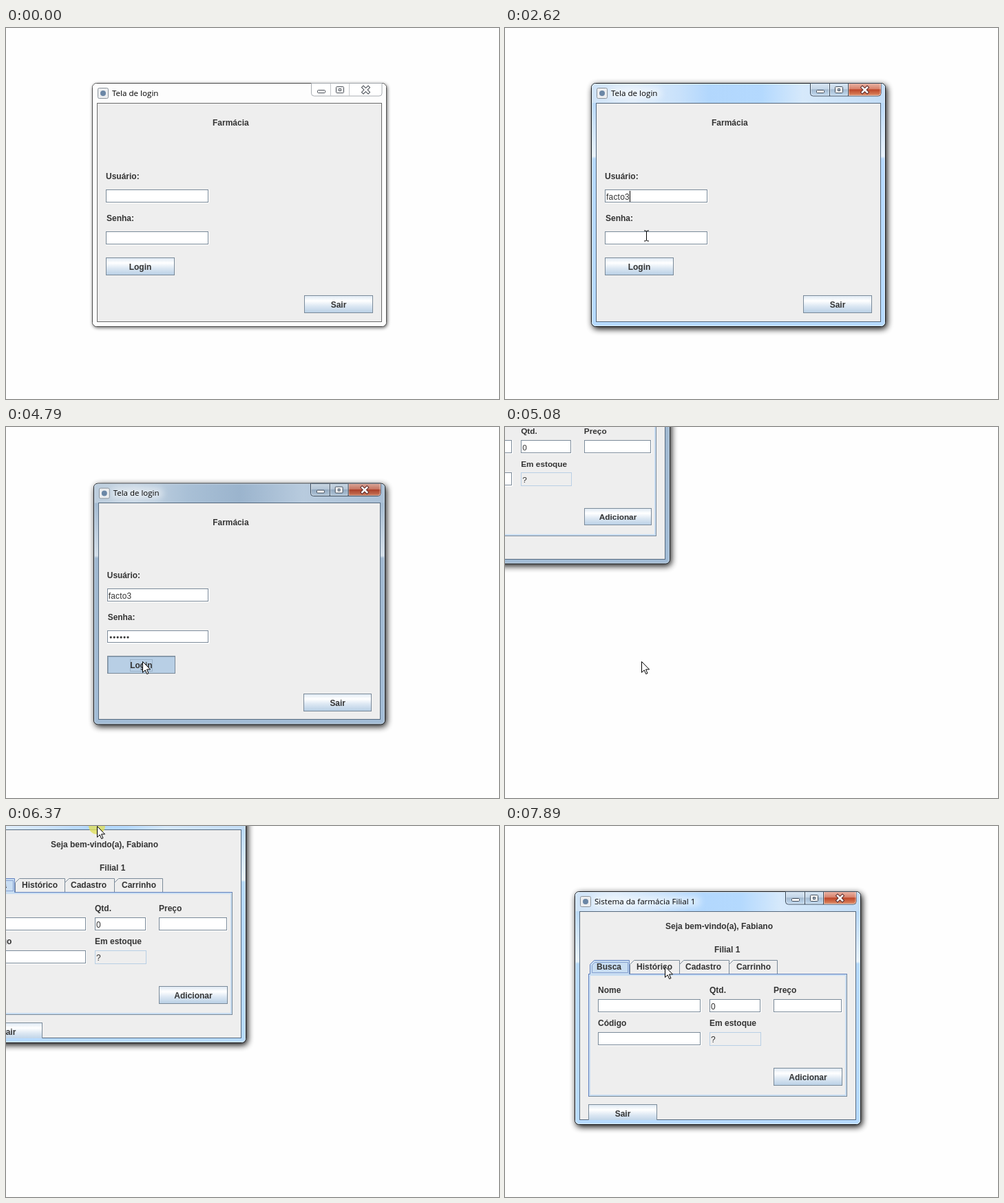
An HTML page for the animation above (8 s loop, 716 by 540 pixels).

```html
<!DOCTYPE html>
<html lang="pt">
<head>
<meta charset="utf-8">
<title>Tela de login</title>
<style>
html, body { margin: 0; width: 100%; height: 100%; overflow: hidden; background: #fefefe; }
svg { display: block; width: 716px; height: 540px; }
text { font: 12px "Liberation Sans", Arial, sans-serif; fill: #333; white-space: pre; }
.b { font-weight: bold; }
.title { font: 11.6px "Open Sans", "Noto Sans", sans-serif; fill: #000; }
.mid { text-anchor: middle; }
.crisp { shape-rendering: crispEdges; }
</style>
</head>
<body>
<svg id="stage" viewBox="0 0 716 540" xmlns="http://www.w3.org/2000/svg"></svg>
<script>
const LOOP = 8000;
const USER = 'facto3';
const CARET = [22, 25, 32, 38, 42, 49, 56];
const SHADE = '#7a8a99', BLUE = '#6382bf', PALE = '#b8cfe5';

const MODES = {
  off: {
    edge: '#4f4f4f', rim: '#fff', blur: 2.4, dark: .6, dx: 1, dy: 1.5, line: '#6b6b6b',
    side: [[0, '#fdfdfd'], [1, '#fdfdfd']],
    bar: [[0, '#fdfdfd'], [1, '#fdfdfd']]
  },
  on: {
    edge: '#16191d', rim: '#e9f4ff', blur: 4.6, dark: .95, dx: 2, dy: 3, line: '#56697d',
    side: [[0, '#c0dcf7'], [.08, '#b9d9f8'], [.3, '#eaf3fc'], [.31, '#b7dafd'], [1, '#b7dbff']],
    bar: [[0, '#cfe3f7'], [.14, '#deecfa'], [.3, '#c8e1fb'], [.4, '#b2d7fd'], [.58, '#b4d9fe'], [.72, '#d6e9fb'], [1, '#c3ddf6']]
  },
  dim: {
    edge: '#16191d', rim: '#d3e1ee', blur: 4.6, dark: .9, dx: 2, dy: 3, line: '#56697d',
    side: [[0, '#a6bdd4'], [.08, '#a3bad1'], [.3, '#d5e0ea'], [.31, '#a0b8d0'], [1, '#a2bcd6']],
    bar: [[0, '#bccddd'], [.14, '#c6d5e3'], [.32, '#a9c0d6'], [.5, '#9bb4cd'], [.72, '#b8cbde'], [1, '#aac0d6']]
  }
};

const stops = list => list.map(([o, c]) => `<stop offset="${o}" stop-color="${c}"/>`).join('');
const gradient = (id, list, across) =>
  `<linearGradient id="${id}" x2="${across ? 1 : 0}" y2="${across ? 0 : 1}">${stops(list)}</linearGradient>`;
const box = (x, y, w, h, fill, more = '') => `<rect x="${x}" y="${y}" width="${w}" height="${h}" fill="${fill}" ${more}/>`;
const frame = (x, y, w, h, color, fill = 'none') =>
  box(x + .5, y + .5, w - 1, h - 1, fill, `stroke="${color}" class="crisp"`);
const text = (x, y, s, cls = 'b', more = '') => `<text x="${x}" y="${y}" class="${cls}" ${more}>${s}</text>`;

const button = (x, y, label) =>
  frame(x, y, 100, 26, SHADE, 'url(#face)') + text(x + 50, y + 18, label, 'b mid');
const field = (x, y, w, value = '') =>
  box(x, y, w, 20, '#fff') + frame(x, y, w - 1, 19, SHADE, '#fff') + text(x + 2, y + 15, value, '');

function captionButtons(w, mode) {
  const live = mode !== 'off';
  const ink = live ? '#414c5a' : '#4a4f57';
  const x = w - 110;
  const shape = `M${x + .5} .5V15q0 4 4 4H${x + 99}q4 0 4-4V.5z`;
  const cut = `M${x + 28.5} 1V19M${x + 55.5} 1V19`;
  const close = `M${x + 56} 1H${x + 103}V15q0 3.5-4 3.5H${x + 56}z`;
  const cross = `M${x + 76} 6.5l7 7m0-7l-7 7`;
  return (live
      ? `<path d="${shape}" fill="url(#cap-${mode})" stroke="#38485a"/><path d="${close}" fill="url(#red-${mode})"/>` +
        `<path d="M${x + 1.5} 1V15q0 3 3 3H${x + 27.5}V1M${x + 29.5} 1V18H${x + 54.5}V1M${x + 56.5} 1V18H${x + 99}q3 0 3-3V1" fill="none" stroke="#fff" opacity=".45"/>` +
        `<path d="${cut}" stroke="#38485a"/>`
      : `<path d="${shape}" fill="#fff" stroke="#a9adb2"/><path d="${cut}" stroke="#c4c7ca"/>`) +
    box(x + 9.5, 10.5, 11, 4, '#fff', `stroke="${ink}" rx="1"`) +
    box(x + 36.5, 5.5, 11, 9, '#fff', `stroke="${ink}" rx="1"`) +
    box(x + 40.5, 8.5, 3, 3, live ? '#b7c8da' : '#fff', `stroke="${ink}"`) +
    `<path d="${cross}" stroke="${live ? '#5b2a2a' : ink}" stroke-width="4.6" stroke-linecap="square"/>` +
    `<path d="${cross}" stroke="#fff" stroke-width="2.6" stroke-linecap="square"/>`;
}

function chrome(w, h, title, mode) {
  const m = MODES[mode];
  const glow = mode === 'off' ? '' :
    `<rect x="26" y="7" width="${title.length * 5.4 + 6}" height="16" rx="8" fill="#fff" opacity=".5" filter="url(#glow)"/>`;
  return `<g data-mode="${mode}">
    <rect x="${m.dx}" y="${m.dy}" width="${w}" height="${h}" rx="7" opacity="${m.dark}" filter="url(#sh-${mode})"/>
    <rect x=".5" y=".5" width="${w - 1}" height="${h - 1}" rx="6" fill="url(#side-${mode})" stroke="${m.edge}"/>
    <path d="M1 29V7q0-6 6-6H${w - 7}q6 0 6 6V29z" fill="url(#bar-${mode})"/>
    <rect x="1.5" y="1.5" width="${w - 3}" height="${h - 3}" rx="5" fill="none" stroke="${m.rim}" opacity=".8"/>
    ${glow}
    <rect x="8.5" y="7.5" width="15" height="15" rx="2" fill="#eceef0" stroke="#8c949c"/>
    <circle cx="16" cy="15" r="4" fill="#6b87a6"/>
    ${text(29, 19, title, 'title')}
    ${captionButtons(w, mode)}
    ${frame(7, 29, w - 14, h - 36, m.line, '#eee')}
  </g>`;
}

function loginWindow() {
  const dots = Array.from({ length: 6 }, (_, i) => `<circle class="dot" cx="${25.5 + 5 * i}" cy="226.5" r="1.6" fill="#333"/>`);
  return `<g id="login">
    ${['off', 'on', 'dim'].map(m => chrome(428, 355, 'Tela de login', m)).join('')}
    ${text(175, 62, 'Farmácia')}
    ${text(20, 140, 'Usuário:')}${field(20, 155, 150)}
    <text id="user" x="22" y="170" letter-spacing=".2"></text>
    ${text(21, 201, 'Senha:')}${field(20, 216, 150)}${dots.join('')}
    <rect id="caret" width="1" height="16" fill="#000" class="crisp"/>
    ${button(20, 254, 'Login')}
    <g id="hover">${frame(20, 254, 100, 26, PALE)}${frame(21, 255, 98, 24, BLUE)}${frame(22, 256, 96, 22, PALE)}</g>
    <g id="pressed">
      ${frame(20, 254, 100, 26, SHADE, PALE)}
      <path d="M21.5 279V255.5H119" fill="none" stroke="#93a9bf" class="crisp"/>
      ${frame(54, 259, 33, 18, '#9db3c9')}${text(70, 272, 'Login', 'b mid')}
    </g>
    ${button(308, 309, 'Sair')}
  </g>`;
}

function shopWindow() {
  const tab = (x, w, label, tx) =>
    `<path d="M${x + .5} 120V106.5l6-6H${x + w + .5}V120" fill="#eee" stroke="${SHADE}"/>` + text(tx, 114, label);
  return `<g id="shop">
    ${['on', 'dim'].map(m => chrome(416, 340, 'Sistema da farmácia Filial 1', m)).join('')}
    ${text(132, 55, 'Seja bem-vindo(a), Fabiano')}
    ${text(203, 89, 'Filial 1')}
    ${tab(80, 72, 'Histórico', 90)}${tab(152, 72, 'Cadastro', 161)}${tab(224, 70, 'Carrinho', 235)}
    ${frame(20, 120, 376, 179, BLUE, '#eee')}
    <rect x="22" y="122" width="372" height="175" fill="none" stroke="#c8ddf2" stroke-width="2" class="crisp"/>
    <path d="M395.5 121V298.5H21" fill="none" stroke="${SHADE}" class="crisp"/>
    <path d="M22.5 122V106.5l6-6H79.5V122z" fill="#c8ddf2"/>
    <path d="M22.5 120.5V106.5l6-6H79.5V120.5" fill="none" stroke="${BLUE}"/>
    <path d="M25.5 118.5V107.5l4-4H77.5V118.5z" fill="none" stroke="${BLUE}" opacity=".65"/>
    ${text(32, 114, 'Busca')}
    ${text(34, 148, 'Nome')}${field(34, 157, 150)}
    ${text(196, 148, 'Qtd.')}${field(196, 157, 75, '0')}
    ${text(289, 148, 'Preço')}${field(289, 157, 100)}
    ${text(34, 196, 'Código')}${field(34, 205, 150)}
    ${text(196, 196, 'Em estoque')}${frame(196, 205, 75, 20, PALE)}${text(198, 220, '?', '')}
    ${button(289, 257, 'Adicionar')}
    <g clip-path="url(#client)">${button(20, 310, 'Sair')}</g>
  </g>`;
}

const defs = Object.entries(MODES).map(([id, m]) =>
  gradient('side-' + id, m.side) + gradient('bar-' + id, m.bar, true) +
  `<filter id="sh-${id}" x="-20%" y="-20%" width="140%" height="140%"><feGaussianBlur stdDeviation="${m.blur}"/></filter>`).join('') +
  gradient('face', [[0, '#dde8f3'], [.3, '#fff'], [.6, '#dde8f3'], [1, PALE]]) +
  gradient('cap-on', [[0, '#d9e7f4'], [.45, '#c3d5e7'], [.5, '#a3b9cf'], [1, '#c3dcf3']]) +
  gradient('cap-dim', [[0, '#c9d6e2'], [.45, '#b4c5d6'], [.5, '#93a9bf'], [1, '#b0c5d9']]) +
  gradient('red-on', [[0, '#e9b3a4'], [.45, '#d7806a'], [.5, '#bd4629'], [1, '#dd8a63']]) +
  gradient('red-dim', [[0, '#d9a597'], [.45, '#c67562'], [.5, '#ab4029'], [1, '#c8785a']]) +
  `<filter id="glow" x="-20%" y="-100%" width="140%" height="300%"><feGaussianBlur stdDeviation="5"/></filter>
   <clipPath id="client"><rect x="8" y="30" width="400" height="303"/></clipPath>`;

const stage = document.getElementById('stage');
stage.innerHTML = `<defs>${defs}</defs>
  ${box(0, 0, 716, 540, '#fefefe')}
  ${loginWindow()}${shopWindow()}
  <circle id="spot" r="12" fill="#e0e05a" opacity=".8"/>
  <path id="arrow" d="M.5 .5V16.3L4.2 12.8 6.7 18.5 9 17.5 6.5 11.9H11.6z" fill="#fff" stroke="#000"/>
  <path id="beam" d="M-3.5-7.5H-1.5L0-6.5 1.5-7.5H3.5M0-6.5V6.5M-3.5 7.5H-1.5L0 6.5 1.5 7.5H3.5" transform="translate(0 0)" fill="none" stroke="#000"/>`;

const $ = id => document.getElementById(id);
const login = $('login'), shop = $('shop'), dots = stage.querySelectorAll('.dot');

const POINTER = [
  [0, ''], [130, 'arrow', 515, 460], [260, 'arrow', 301, 327], [410, 'arrow', 240, 275],
  [510, 'beam', 211, 243], [1190, 'beam', 214, 246], [1310, 'beam', 218, 249],
  [2350, 'beam', 218, 251], [2620, 'beam', 205, 302], [4030, 'arrow', 201, 322],
  [4160, 'arrow', 198, 341], [5210, 'arrow', 150, 210], [5330, 'arrow', 70, 40], [5440, ''],
  [6110, 'drag'], [7260, 'arrow', 295, 122], [7380, 'arrow', 282, 135], [7510, 'arrow', 268, 155],
  [7640, 'arrow', 252, 178], [7760, 'arrow', 240, 195], [7890, 'arrow', 232, 204]
];
const TYPED = [[0, 0], [1440, 1], [1570, 2], [1820, 3], [1950, 4], [2100, 5], [2350, 6]];
const SECRET = [[0, 0], [3000, 1], [3120, 2], [3390, 3], [3640, 5], [3910, 6]];
const FOCUS = [[0, ''], [790, 'user'], [2740, 'secret'], [4540, '']];
const LOGIN = [[0, 'off', 1, 1], [790, 'on', 1, 1], [4790, 'dim', .9907, 1], [4960, 'dim', .965, .3], [5080, '', 1, 0]];
const SHOP = [
  [0, '', 1, 0, 0], [5080, 'dim', .985, -173, -138], [5210, 'on', 1, -173, -138],
  [6110, 'on', 1, -152, -114], [6240, 'on', 1, -114, -72], [6370, 'on', 1, -67, -24],
  [6500, 'on', 1, -12, 18], [6620, 'on', 1, 42, 56], [6750, 'on', 1, 82, 82],
  [6880, 'on', 1, 100, 95], [7010, 'on', 1, 101, 95]
];

const at = (track, t) => track.findLast(row => row[0] <= t).slice(1);
const show = (el, on) => el.setAttribute('display', on ? 'inline' : 'none');

function place(win, mode, scale, x, y, w, h) {
  show(win, mode);
  win.querySelectorAll('[data-mode]').forEach(g => show(g, g.dataset.mode === mode));
  const dx = x + w / 2 * (1 - scale), dy = y + h / 2 * (1 - scale);
  win.setAttribute('transform', `translate(${dx} ${dy}) scale(${scale})`);
}

function draw(t) {
  const [mode, scale, alpha] = at(LOGIN, t);
  place(login, mode, scale, 125, 80, 428, 355);
  login.setAttribute('opacity', alpha);
  const [typed] = at(TYPED, t), [secret] = at(SECRET, t), [focus] = at(FOCUS, t);
  $('user').textContent = USER.slice(0, typed);
  dots.forEach((d, i) => show(d, i < secret));
  const caret = $('caret');
  show(caret, focus);
  caret.setAttribute('x', focus === 'user' ? CARET[typed] : 22 + 5 * secret);
  caret.setAttribute('y', focus === 'user' ? 157 : 218);
  show($('hover'), t >= 4160 && t < 4790);
  show($('pressed'), t >= 4790);

  const [shopMode, shopScale, sx, sy] = at(SHOP, t);
  place(shop, shopMode, shopScale, sx, sy, 416, 340);

  let [kind, x = 0, y = 0] = at(POINTER, t);
  const drag = kind === 'drag';
  if (drag) [kind, x, y] = ['arrow', sx + 199, sy + 24];
  show($('spot'), drag);
  $('spot').setAttribute('transform', `translate(${x} ${y})`);
  for (const id of ['arrow', 'beam']) {
    show($(id), kind === id);
    const half = id === 'beam' ? .5 : 0;
    $(id).setAttribute('transform', `translate(${x + half} ${y + half})`);
  }
}

const start = performance.now();
function tick() {
  draw((performance.now() - start) % LOOP);
  requestAnimationFrame(tick);
}
tick();
</script>
</body>
</html>
```
